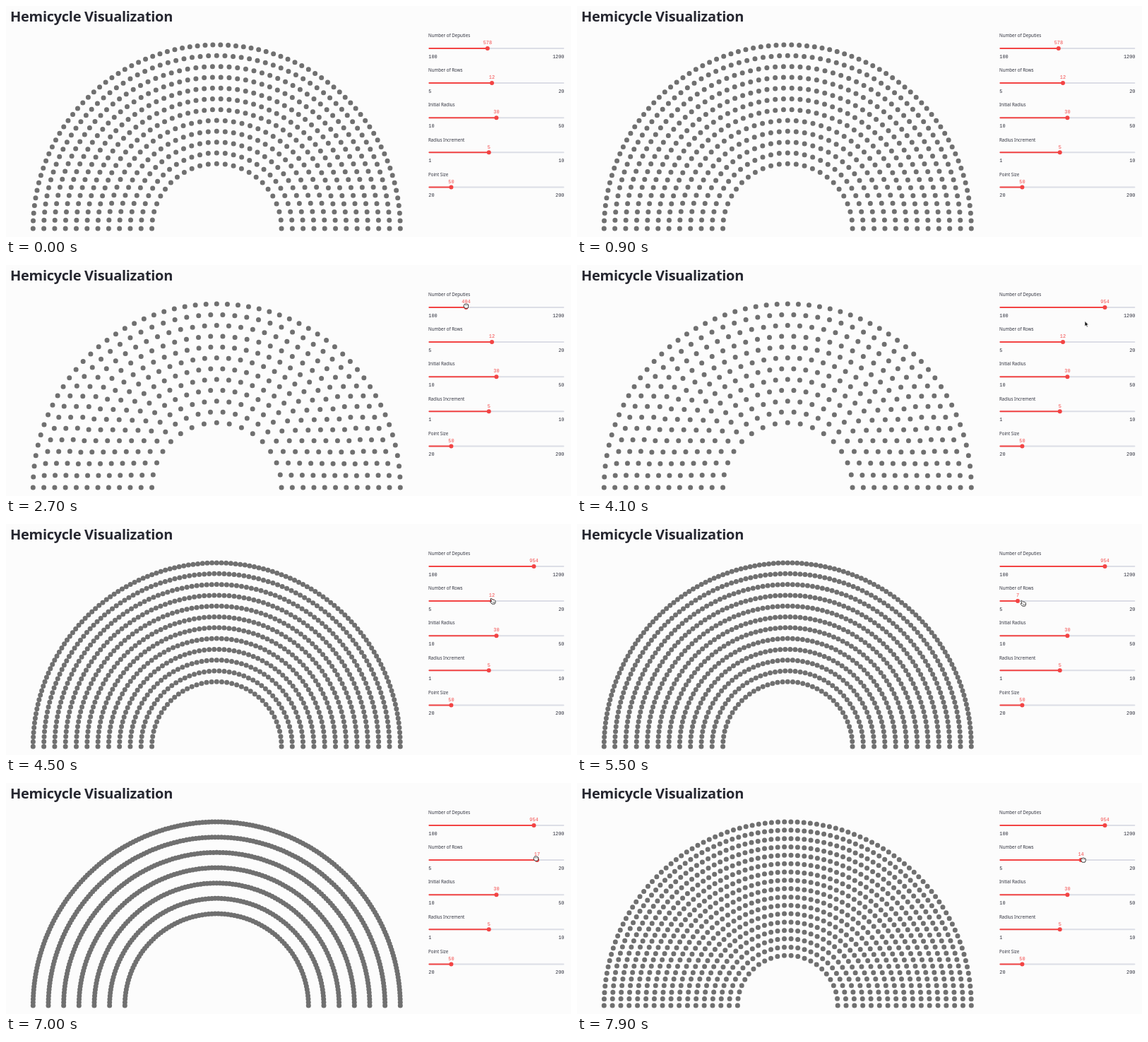
An HTML page for the animation above (8000 ms loop, 800 px wide and 327 px high).

```html
<!DOCTYPE html>
<html lang="en">
<head>
<meta charset="utf-8">
<title>Hemicycle Visualization</title>
<style>
  html, body { margin: 0; width: 100%; height: 100%; overflow: hidden; background: #fcfcfc; }
  svg { display: block; width: 800px; height: 327px; }
  text { font-family: "Noto Sans", "Open Sans", sans-serif; fill: #31333f; }
  .title { font-size: 20px; font-weight: 700; letter-spacing: -.28px; fill: #262730; }
  .label { font-size: 6.2px; }
  .num { font-family: "Liberation Mono", monospace; font-size: 6.9px; }
  .value { fill: #f34a4a; text-anchor: middle; }
  .max { text-anchor: end; }
  .track { fill: #dcdee6; }
  .fill, .knob { fill: #f34444; }
  .seats { fill: none; stroke: #707070; stroke-width: 7; stroke-linecap: round; }
  .pointer { fill: #fff; stroke: #222; stroke-width: .9; stroke-linejoin: round; }
  .arrow { fill: #111; stroke: #fff; stroke-width: .7; }
</style>
</head>
<body>
<svg id="stage" viewBox="0 0 800 327">
  <text class="title" x="6" y="22">Hemicycle Visualization</text>
  <g id="charts"></g>
  <g id="sliders"></g>
  <g id="cursor">
    <path class="arrow" d="M0 0V7.4L1.8 5.8L3 8.5L4.3 7.9L3.1 5.3H5.4Z"/>
    <g class="pointer">
      <path d="M-2.9 -3.2Q-2.2 -4.2 -1.3 -3.2L.2 -1.7Q1 -2.3 1.7 -1.5Q2.6 -1.9 3.1 -.9Q4.1 -.9 4 .4V2.2L3 4.2H-.9L-3.2 1.4Q-3.5 .2 -2.1 .4L-1.4 .8Z"/>
      <path fill="none" stroke-width=".5" d="M.2 1V2.7M1.4 1V2.7M2.6 1V2.7"/>
    </g>
    <g class="pointer">
      <path d="M-3 -1.4Q-2.6 -3 -1.5 -2.5Q-.7 -3.4 .1 -2.7Q1 -3.3 1.6 -2.5Q3.2 -2.6 3.2 -1V.7Q3 2 2.2 3.2H-1.7L-3.2 1Q-3.7 -.3 -3 -1.4Z"/>
      <path fill="none" stroke-width=".5" d="M-1.3 -1.6V-.4M.1 -1.6V-.4M1.5 -1.6V-.4"/>
    </g>
  </g>
</svg>
<script>
const LOOP = 8000, STEP = 100;
const LEFT = 598.4, WIDTH = 192;
const CX = 298.3, CY = 315, OUTER = 260;
const START_RADIUS = 30, RADIUS_STEP = 5;
const $ = id => document.getElementById(id);

function add(parent, tag, attrs, text = "") {
  const el = document.createElementNS("http://www.w3.org/2000/svg", tag);
  for (const key in attrs) el.setAttribute(key, attrs[key]);
  el.textContent = text;
  parent.append(el);
  return el;
}

// Seats are shared out by radius; the outer row takes the remainder.
function seatPath(seats, rows) {
  const radii = Array.from({ length: rows }, (_, i) => START_RADIUS + i * RADIUS_STEP);
  const sum = radii.reduce((a, b) => a + b);
  const scale = OUTER / radii[rows - 1];
  let left = seats, d = "";
  radii.forEach((r, i) => {
    const n = i === rows - 1 ? left : Math.floor(seats * r / sum);
    left -= n;
    for (let k = 0; k < n; k++) {
      const a = Math.PI * k / (n - 1);
      const x = CX - r * scale * Math.cos(a);
      const y = CY - r * scale * Math.sin(a);
      d += `M${x.toFixed(2)} ${y.toFixed(2)}h.01`;
    }
  });
  return d;
}

// [start time, seats, rows]
const charts = [
  [0, 578, 12], [2600, 404, 12], [4200, 954, 12], [5600, 954, 7], [7200, 954, 17]
].map(([start, seats, rows]) => ({
  start, el: add($("charts"), "path", { class: "seats", d: seatPath(seats, rows) })
}));

function makeSlider(name, min, max, index) {
  const y = index * 49.1, g = $("sliders");
  add(g, "text", { class: "label", x: 598, y: 44.2 + y }, name);
  add(g, "text", { class: "num", x: 598.3, y: 74 + y }, min);
  add(g, "text", { class: "num max", x: 790.5, y: 74 + y }, max);
  const bar = { x: LEFT, y: 59 + y, width: WIDTH, height: 2, rx: 1 };
  add(g, "rect", { ...bar, class: "track" });
  const fill = add(g, "rect", { ...bar, class: "fill" });
  const knob = add(g, "circle", { class: "knob", cy: 60 + y, r: 3 });
  const value = add(g, "text", { class: "num value", y: 54.2 + y });
  return v => {
    const w = (v - min) / (max - min) * WIDTH;
    fill.setAttribute("width", w);
    knob.setAttribute("cx", LEFT + w);
    value.setAttribute("x", LEFT + w);
    value.textContent = v;
  };
}

const [setSeats, setRows, setInner, setGap, setSize] = [
  ["Number of Deputies", 100, 1200],
  ["Number of Rows", 5, 20],
  ["Initial Radius", 10, 50],
  ["Radius Increment", 1, 10],
  ["Point Size", 20, 200]
].map((s, i) => makeSlider(...s, i));
setInner(START_RADIUS);
setGap(RADIUS_STEP);
setSize(50);

const seatKeys = [[1500, 578], [1900, 501], [2300, 404], [2700, 404], [3500, 954]];
const rowKeys = [[4700, 12], [5200, 7], [5700, 7], [6300, 17], [7400, 17], [7800, 14]];

// [time, x, y, shape]
const ARROW = 0, HAND = 1, FIST = 2;
const cursorKeys = [
  [1000, 668, 84, ARROW], [1200, 682, 61, HAND], [1500, 682, 60, FIST],
  [1900, 668, 60, FIST], [2300, 651.5, 58, FIST], [2700, 651.5, 58, FIST],
  [3500, 748, 60, HAND], [3700, 746, 65, ARROW], [4100, 719, 79.5, ARROW],
  [4300, 704, 95, ARROW], [4500, 689, 109, HAND], [4700, 689, 109, FIST],
  [5200, 631.5, 112, HAND], [5500, 631.5, 112, HAND], [5700, 626, 109, FIST],
  [6300, 751, 109, FIST], [6400, 751, 111, HAND], [6600, 751, 111, HAND],
  [7000, 750.5, 107, FIST], [7400, 753, 109, FIST], [7800, 717, 109, FIST]
];
const shapes = [...$("cursor").children];

function at(keys, t, col = 1) {
  const next = keys.findIndex(k => k[0] > t);
  if (next === 0) return keys[0][col];
  if (next < 0) return keys[keys.length - 1][col];
  const a = keys[next - 1], b = keys[next];
  return a[col] + (b[col] - a[col]) * (t - a[0]) / (b[0] - a[0]);
}

const show = (el, on) => { el.style.display = on ? "" : "none"; };

function draw(t) {
  charts.forEach((c, i) => {
    const end = i + 1 < charts.length ? charts[i + 1].start : LOOP;
    show(c.el, t >= c.start && t < end);
  });
  setSeats(Math.round(at(seatKeys, t)));
  setRows(Math.round(at(rowKeys, t)));
  const key = cursorKeys.filter(k => k[0] <= t).pop();
  show($("cursor"), key);
  if (!key) return;
  const x = at(cursorKeys, t, 1), y = at(cursorKeys, t, 2);
  $("cursor").setAttribute("transform", `translate(${x} ${y})`);
  shapes.forEach((s, i) => show(s, i === key[3]));
}

const origin = performance.now();
function tick() {
  const t = (performance.now() - origin) % LOOP;
  draw(Math.floor(t / STEP) * STEP);
  requestAnimationFrame(tick);
}
tick();
</script>
</body>
</html>
```
